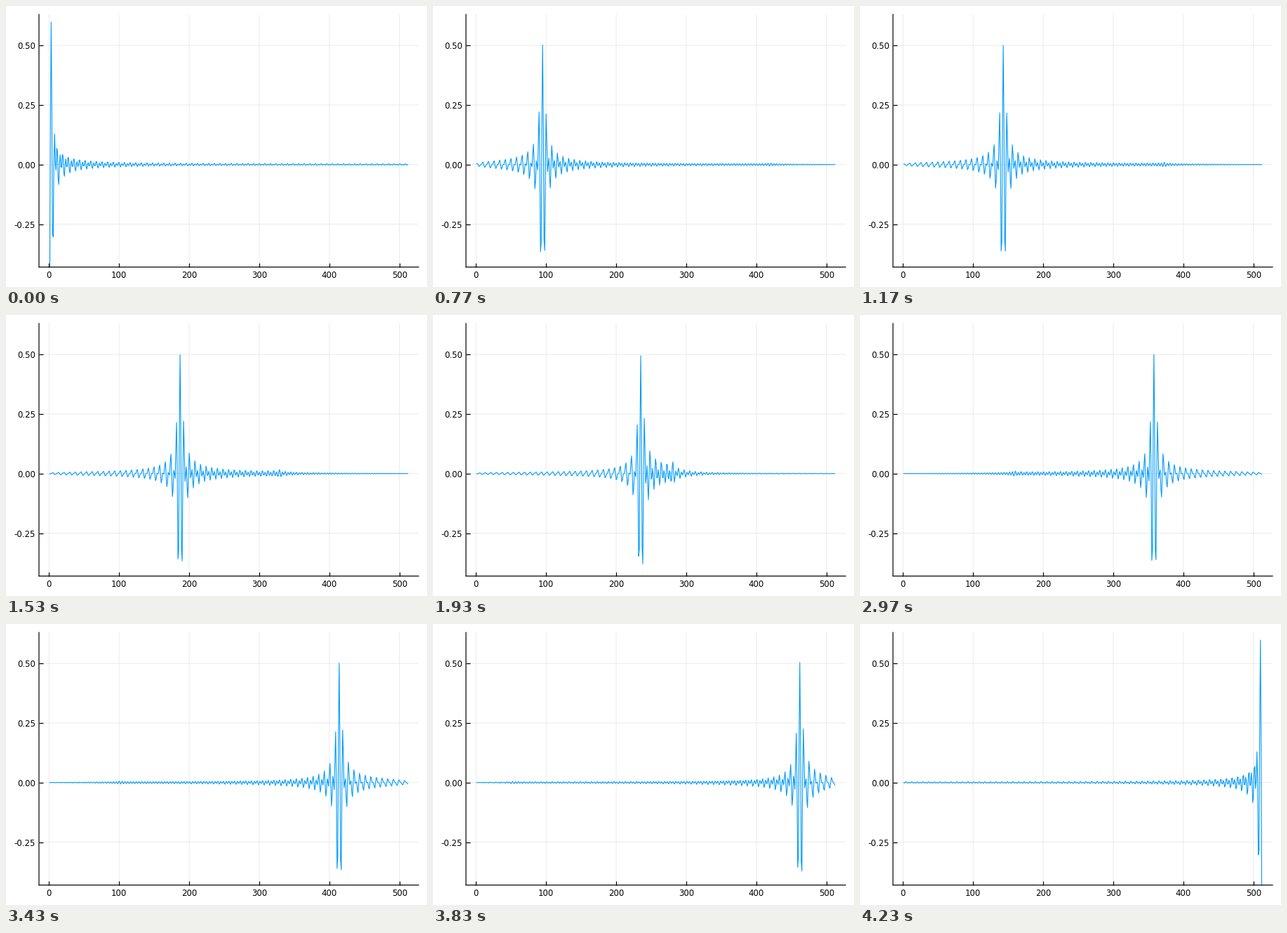
Animation of 600x400 px, one loop 4260 ms. Source, as a matplotlib script:

```python
import numpy as np
import matplotlib.pyplot as plt
from matplotlib.animation import FuncAnimation

W, H, DPI = 600, 400, 100
LOOP = 4260
N, BAND = 512, 128
PX = 72 / DPI  # one pixel in points


def localized_basis():
    """Pivoted Gram-Schmidt on unit impulses projected to one octave band."""
    node = np.arange(N) + 0.5
    freq = np.arange(BAND, 2 * BAND)
    modes = np.sqrt(2 / N) * np.cos(np.pi * np.outer(node, freq) / N)

    rest = modes.T.copy()
    basis = np.empty((BAND, N))
    for i in range(BAND):
        # Rounding makes mirrored ties resolve to the lower node.
        pivot = np.round((rest**2).sum(axis=0), 10).argmax()
        q = rest[:, pivot] / np.linalg.norm(rest[:, pivot])
        rest -= np.outer(q, q @ rest)
        basis[i] = modes @ q

    peak = np.abs(basis).argmax(axis=1)
    basis *= np.sign(basis[np.arange(BAND), peak])[:, None]
    return basis[np.argsort(peak, kind="stable")]


waves = localized_basis()

plt.rcParams["font.family"] = "DejaVu Sans"
plt.rcParams["path.snap"] = False
fig = plt.figure(figsize=(W / DPI, H / DPI), dpi=DPI, facecolor="white")
left, right, top, bottom = 47, 588, 12, 371.6
ax = fig.add_axes([left / W, 1 - bottom / H,
                   (right - left) / W, (bottom - top) / H])
margin = 0.03 * (N - 1)
ax.set_xlim(1 - margin, N + margin)
ax.set_ylim(-0.43, 0.63)

yticks = [-0.25, 0, 0.25, 0.5]
ax.set_xticks(range(0, 501, 100))
ax.set_yticks(yticks, [f"{y:.2f}" for y in yticks])
ax.tick_params(direction="in", length=6 * PX, width=1.2 * PX, pad=5 * PX,
               labelsize=8.5, color="black")
ax.grid(color="#e6e6e6", linewidth=0.8 * PX)
ax.set_axisbelow(True)
for side, spine in ax.spines.items():
    spine.set_linewidth(1.2 * PX)
    spine.set_visible(side in ("left", "bottom"))

line, = ax.plot(np.arange(1, N + 1), waves[0], color="#009afa",
                linewidth=1.1 * PX, solid_joinstyle="round")


def draw(i):
    line.set_ydata(waves[i])
    return line,


anim = FuncAnimation(fig, draw, frames=BAND, interval=LOOP / BAND,
                     repeat=True, repeat_delay=0)
plt.show()
```
